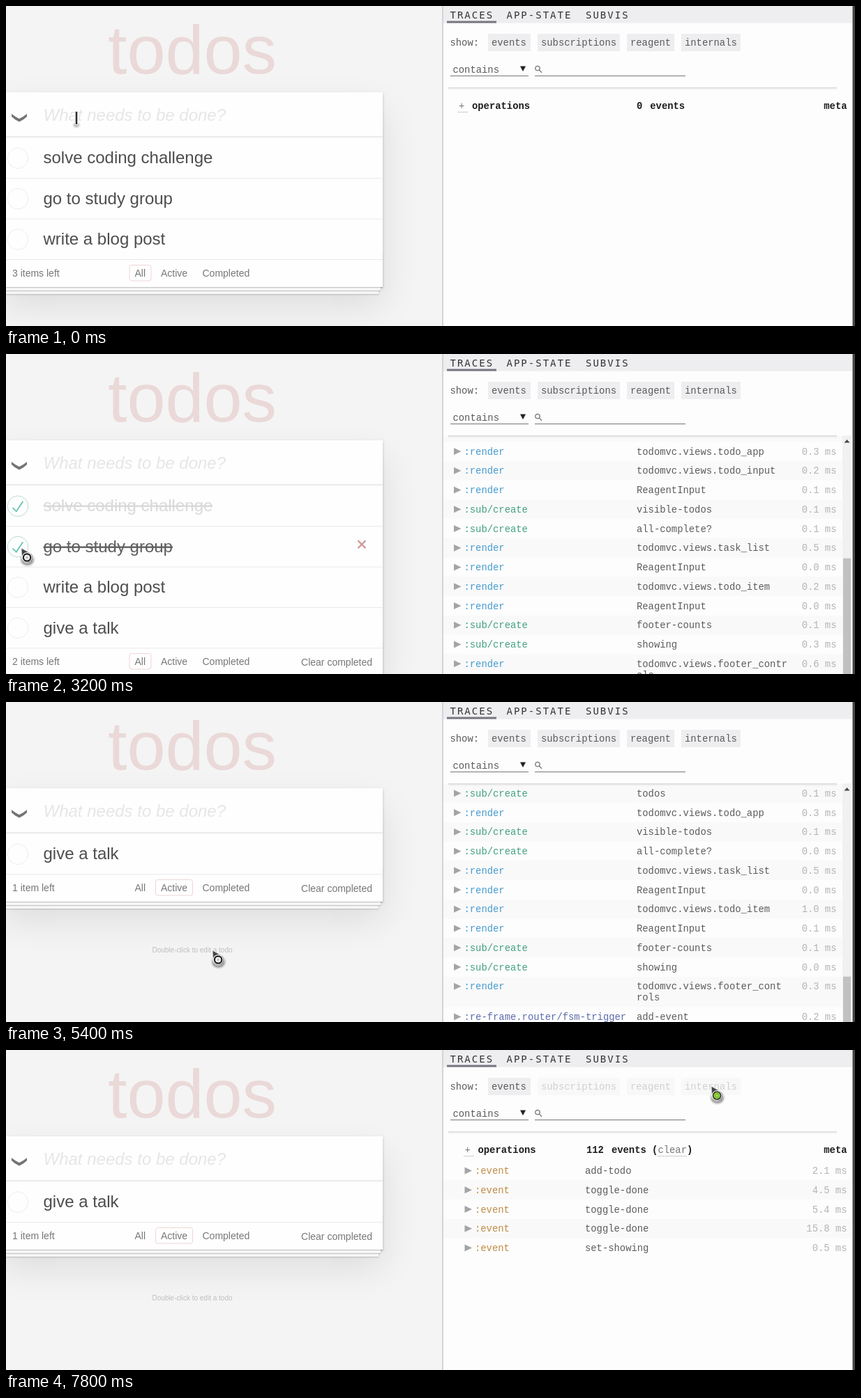
These frames come from a looping animation (1217x460 px, 8000 ms). An HTML page:

```html
<!DOCTYPE html>
<html lang="en">
<head>
<meta charset="utf-8">
<title>Todo list with trace panel</title>
<style>
  html, body { margin: 0; width: 100%; height: 100%; overflow: hidden; background: #f4f4f4; }
  #stage { position: relative; width: 100%; height: 100%; overflow: hidden; contain: strict; }
  #card, #foot { position: absolute; left: -6px; width: 546px; background: #fefefe; }
  #card { top: 124px; box-shadow: 0 2px 4px rgba(0,0,0,.2), 0 25px 50px rgba(0,0,0,.1); }
  #foot { bottom: 0; left: 0; height: 50px;
    box-shadow: 0 1px 1px rgba(0,0,0,.2), 0 8px 0 -3px #f6f6f6, 0 9px 1px -3px rgba(0,0,0,.2),
      0 16px 0 -6px #f6f6f6, 0 17px 2px -6px rgba(0,0,0,.2); }
  svg { position: absolute; left: 0; top: 0; display: block; width: 100%; height: 100%; overflow: hidden; }
  text { white-space: pre; }
  .sans { font-family: "Liberation Sans", Arial, sans-serif; }
  .mono { font: 13.85px "Liberation Mono", "Courier New", monospace; }
  .tab { font: 14px "DejaVu Sans Mono", monospace; letter-spacing: 2px; fill: #333; }
  .b { font-weight: bold; fill: #1c1c1c; }
</style>
</head>
<body>
<div id="stage">
<div id="card"><div id="foot"></div></div>
<svg viewBox="0 0 1217 460">
  <defs>
    <clipPath id="view"><rect x="627" y="118" width="586" height="342"/></clipPath>
    <linearGradient id="fall" x2="0" y2="1">
      <stop stop-color="#000" stop-opacity=".2"/><stop offset="1" stop-color="#000" stop-opacity="0"/>
    </linearGradient>
    <filter id="blur" x="-50%" y="-50%" width="200%" height="200%"><feGaussianBlur stdDeviation="1.6"/></filter>
  </defs>
  <text class="sans" x="267" y="97" font-size="99" text-anchor="middle" fill="#ead9d8">todos</text>
  <g id="todo" class="sans"></g>
  <rect x="625" width="2" height="460" fill="#d4d4d4"/>
  <rect x="627" width="587" height="460" fill="#fdfdfd"/>
  <g id="table" class="mono" clip-path="url(#view)"></g>
  <rect x="627" width="587" height="24.5" fill="#eeeef1"/>
  <rect x="632" y="21.5" width="71" height="3" fill="#767681"/>
  <text class="tab" x="636.5" y="18">TRACES</text>
  <text class="tab" x="717.5" y="18">APP-STATE</text>
  <text class="tab" x="831" y="18">SUBVIS</text>
  <g class="mono" fill="#5a5a5a">
    <text x="636.5" y="57">show:</text>
    <g id="buttons"></g>
    <text x="640.5" y="95.5">contains</text>
  </g>
  <path d="M637 100.5H749M758 100.5H974" stroke="#777"/>
  <path d="M737 86.500h8l-4 7.500z" fill="#222"/>
  <g fill="none" stroke="#777" stroke-width="1.3"><circle cx="762" cy="89.5" r="3.2"/><path d="M764.3 92l3.7 3.8"/></g>
  <rect x="634" y="117" width="557" height="1" fill="#d6d6d6"/>
  <rect x="634" y="118" width="557" height="3" fill="url(#fall)" opacity=".4"/>
  <g id="bar"></g>
  <rect x="1213.5" width="3.5" height="460" fill="#444"/>
  <g id="cursor"></g>
</svg>
</div>
<script>
const $ = id => document.getElementById(id);
const LOOP = 8000, ROW = 27.75, LIST = 190, ITEM = 58.4, CHAR = 8.31;
const tasks = ['solve coding challenge', 'go to study group', 'write a blog post', 'give a talk'];
const toggled = [2600, 3150, 3650];
const colors = {
  ':render': '#469bd0', ':re-frame.router/fsm-trigger': '#5b6bab',
  ':event': '#c08c45', ':sub/run': '#a25bf0', ':sub/create': '#43a083'
};
const buttons = [['events', 691, 61], ['subscriptions', 762, 118, 6600], ['reagent', 890, 68, 7200], ['internals', 968, 85, 7800]];

const text = (x, y, s, attrs = '') => `<text x="${x}" y="${y}" ${attrs}>${s}</text>`;
const rect = (x, y, w, h, attrs) => `<rect x="${x}" y="${y}" width="${w}" height="${h}" ${attrs}/>`;
const path = (d, attrs) => `<path d="${d}" ${attrs}/>`;
const ball = (r, fill) => `<circle cx="7.5" cy="12.5" r="${r}" fill="${fill}"/>`;

// Each event leaves the same chain of router, subscription and render traces.
function chain(event, times, { input = false, drop = 0 } = {}) {
  const fsm = ':re-frame.router/fsm-trigger', run = ':sub/run', make = ':sub/create', view = ':render';
  const views = n => [view, 'todomvc.views.' + n], field = [view, 'ReagentInput'];
  const subs = ['sorted-todos', 'showing', 'todos', 'visible-todos', 'all-complete?', 'completed-count', 'footer-counts'];
  const list = [
    [fsm, 'add-event'], [':event', event], [fsm, 'finish-run'], [fsm, 'run-queue'],
    ...subs.slice(drop).map(n => [run, n]),
    [make, 'todos'], views('todo_app'), ...(input ? [views('todo_input'), field] : []),
    [make, 'visible-todos'], [make, 'all-complete?'], views('task_list'), field, views('todo_item'), field,
    [make, 'footer-counts'], [make, 'showing'], views('footer_controls')
  ];
  const ms = times.split(' ');
  return list.map(([op, name], i) => ({ op, name, ms: ms[i] || '0.1' }));
}
const subTimes = ' 0.1 0.1 0.1 0.1 0.1 0.1 0.0 0.1 ';
const traces = [
  { op: ':render', name: 'todomvc.views.todo_input', ms: '0.7' },
  { op: ':render', name: 'ReagentInput', ms: '0.2' },
  ...chain('add-todo', '0.2 2.1 0.1 2.5 0.1 0.1 0.1 0.1 1.1 0.1 0.0 0.1 0.3 0.2 0.1 0.1 0.1 0.5 0.0 0.2 0.0 0.1 0.3 0.6', { input: true }),
  ...chain('toggle-done', '0.2 4.5 0.1 4.9' + subTimes + '0.3 0.1 0.0 0.5 0.0 1.0 0.1 0.1 0.0 0.3'),
  ...chain('toggle-done', '0.2 5.4 0.1 5.8' + subTimes + '0.4 0.1 0.0 0.9 0.1 0.2 0.1 0.1 0.0 0.5'),
  ...chain('toggle-done', '0.8 15.8 0.2 16.8' + subTimes + '0.4 0.1 0.0 0.8 0.1 0.2 0.1 0.1 0.0 0.4'),
  ...chain('set-showing', '0.2 0.5 0.1 0.9', { drop: 2 })
];

// Latest value whose start time has passed.
const at = (t, steps) => steps.filter(s => t >= s[0]).pop()[1];
const traceCount = t => at(t, [[0, 0], [1100, 2], [1400, 26], [2600, 48], [3150, 70], [3650, 92], [5000, 112]]);

const moves = [
  [0, 101, 160], [1700, 101, 160], [2300, 25, 219], [2800, 25, 219], [3100, 22, 279], [3300, 22, 279],
  [3600, 24, 338], [3800, 24, 338], [4200, 204, 390], [4300, 204, 390], [4800, 234, 438], [5300, 234, 438],
  [5400, 296, 357], [5600, 722, 182], [5800, 722, 182], [6400, 788, 55], [6600, 788, 53], [7000, 901, 53],
  [7300, 901, 53], [7600, 1011, 52], [8000, 1011, 52]
];
function pointer(t) {
  const i = Math.max(1, moves.findIndex(m => m[0] >= t));
  const [t0, x0, y0] = moves[i - 1], [t1, x1, y1] = moves[i];
  const p = (t - t0) / (t1 - t0);
  return [x0 + (x1 - x0) * p, y0 + (y1 - y0) * p];
}

function scrollTop(t) {
  if (t >= 6600) return 884;
  return t < 3400 ? Math.max(0, Math.min(454, .695 * (t - 2600))) : Math.min(1080, 454 + .76 * (t - 3400));
}

function drawItem(label, y, done, fade, hover) {
  const grey = Math.round(77 + 140 * fade), ink = `rgb(${grey},${grey},${grey})`;
  const cy = y + 28.7;
  let s = `<circle cx="17" cy="${cy}" r="14.8" fill="none" stroke="${done ? '#bddad5' : '#ededed'}"/>`;
  if (done) s += path('M72 25L42 71 27 56l-4 4 20 20 34-52z', `transform="translate(2.2 ${cy - 14.8}) scale(.2963)" fill="#5dc2af"`);
  s += text(53.5, Math.round(y + 36.4), label, `font-size="24" fill="${ink}"${done ? ' text-decoration="line-through"' : ''}`);
  if (hover) s += path(`M504.5 ${cy - 9}l11 11m0 -11l-11 11`, 'stroke="#cc9a9a" stroke-width="2.2"');
  return s + rect(0, y + ITEM - 1.2, 540, 1, 'fill="#e9e9e9"');
}

function drawTodo(t, mx, my) {
  const active = t >= 5000;
  const shown = active ? [3] : t >= 1400 ? [0, 1, 2, 3] : [0, 1, 2];
  const doneCount = toggled.filter(d => t >= d).length;
  const left = (t >= 1400 ? 4 : 3) - doneCount;
  const end = LIST + ITEM * shown.length;
  $('card').style.height = Math.round(end + 39) - 124 + 'px';

  let s = path('M8 155Q14 160 19 162Q24 160 30 155V159Q25 164 19 166.5Q13 164 8 159Z', 'fill="#737373"');
  s += t >= 1100 && t < 1400
    ? text(53.5, 165, 'give a talk', 'font-size="24" fill="#4d4d4d"')
    : text(53.5, 165, 'What needs to be done?', 'font-size="24" font-style="italic" fill="#e6e6e6"');
  s += rect(0, 187.5, 540, 1.5, 'fill="#e5e5e5"');
  shown.forEach((n, i) => {
    const y = LIST + ITEM * i, fade = Math.max(0, Math.min(1, (t - toggled[n]) / 400)) || 0;
    s += drawItem(tasks[n], y, t >= toggled[n], fade, mx < 540 && my >= y && my < y + ITEM);
  });
  const base = Math.round(end + 23.6), small = 'font-size="14" fill="#777"';
  s += text(9, base, `${left} item${left === 1 ? '' : 's'} left`, small);
  const [bx, bw] = active ? [214.5, 53] : [177, 31];
  s += rect(bx, base - 16.5, bw, 22.5, 'rx="3" fill="none" stroke="#efd5d5"');
  s += text(184.5, base, 'All', small) + text(222, base, 'Active', small) + text(281.5, base, 'Completed', small);
  if (doneCount) s += text(525, base + 1, 'Clear completed', small + ' text-anchor="end"');
  s += text(267, base + 88, 'Double-click to edit a todo', 'font-size="10" fill="#bfbfbf" text-anchor="middle"');
  $('todo').innerHTML = s;
}

function drawTable(t) {
  const count = traceCount(t), bar = t >= 2600 && t < 7200;
  const [x, col] = at(t, [[0, [649, 902]], [1100, [659, 810]], [1400, [642, 911]], [2600, [642, 904]], [7200, [643, 936]], [7800, [657.5, 830]]]);
  const right = bar ? 1190.5 : 1205.5, wrap = count > 70 ? 25 : 26;
  const scroll = bar ? scrollTop(t) : 0, top = (bar ? 138.5 : 143.5) - scroll;
  const rows = traces.slice(0, count).filter(({ op }) =>
    !(t >= 6600 && op.startsWith(':sub')) && !(t >= 7200 && op === ':render') && !(t >= 7800 && op.startsWith(':re-')));

  const base = top + 4.5, ev = col + 2 + CHAR * String(count).length + 11;
  let s = text(x, base, '+', 'fill="#777"') + text(x + 19, base, 'operations', 'class="b"');
  let dots = `M${x - 1} ${top + 9}h14`;
  s += text(col + 2, base, count, 'class="b"') + text(ev, base, 'events', 'class="b"');
  if (count) {
    const px = ev + CHAR * 7;
    s += text(px, base, '(', 'class="b"') + text(px + CHAR, base, 'clear', 'fill="#777"') + text(px + CHAR * 6, base, ')', 'class="b"');
    dots += `M${px + CHAR} ${top + 9}h${CHAR * 5}`;
  }
  s += path(dots, 'stroke="#888" stroke-dasharray="1 1.5"') + text(right, base, 'meta', 'class="b" text-anchor="end"');

  let y = top + 30;
  rows.forEach(({ op, name, ms }, i) => {
    const extra = name.length > wrap ? 16 : 0, line = Math.round(y + 4.7);
    if (y > 90 && y < 480) {
      if (i % 2) s += rect(627, y - 14, bar ? 572 : 586, ROW + extra, 'fill="#f9f9f9"');
      s += path(`M${x} ${y - 5}l10.5 5l-10.5 5z`, 'fill="#a4a4a4"');
      s += text(x + 14.5, line, op, `fill="${colors[op]}"`);
      s += text(col, line, name.slice(0, wrap), 'fill="#5c5c5c"');
      if (extra) s += text(col, line + 16, name.slice(wrap), 'fill="#5c5c5c"');
      s += text(right, line, ms + ' ms', 'fill="#b4b4b4" text-anchor="end"');
    }
    y += ROW + extra;
  });
  $('table').innerHTML = s;

  const full = y + scroll - 117, track = 782;
  $('bar').innerHTML = bar
    ? rect(1199, 117, 13, 343, 'fill="#f1f1f1"') + path('M1201.5 127.5h8l-4 -4.5z', 'fill="#444"') +
      rect(1200, 134 + scroll / full * track, 11, track * 805 / full, 'fill="#c1c1c1"')
    : '';
}

function drawButtons(t) {
  $('buttons').innerHTML = buttons.map(([name, x, w, off]) => {
    const dim = t >= off;
    return rect(x, 40, w, 25, `fill="${dim ? '#f8f8f9' : '#eeeef0'}"`) +
      text(x + 5, 57, name, `fill="${dim ? '#d0d0d0' : '#5a5a5a'}"`);
  }).join('');
}

function drawCursor(t, x, y) {
  if (t < 1800) {
    $('cursor').innerHTML = `<ellipse cx="101" cy="171" rx="4" ry="3" opacity=".35" filter="url(#blur)"/>` +
      rect(98.5, 150.5, 5, 21, 'rx="2" fill="#eee"') + rect(99.8, 152, 2.4, 18, 'fill="#2b2b2b"');
    return;
  }
  const link = y < 66 && x > 690 || t >= 4700 && t < 5000;
  $('cursor').innerHTML = `<g transform="translate(${x} ${y}) scale(1.08)">
    <ellipse cx="8" cy="15.5" rx="8.5" ry="7.5" opacity=".45" filter="url(#blur)"/>
    <path d="M0 0L13 7.5A7.4 7.4 0 1 1 .6 14Z" fill="#444" stroke="#e4e4e4" stroke-width=".9"/>` +
    ball(6.9, '#f2f2f2') + ball(5.8, '#1e1e1e') +
    ball(link ? 4.6 : 3.8, link ? '#84c03a' : '#f0f0f0') + ball(1.5, link ? '#a6dc5c' : '#b5b5b5') + '</g>';
}

let shown = -1;
function draw(t) {
  if (t === shown) return;
  shown = t;
  const [x, y] = pointer(t);
  drawTodo(t, x, t < 1800 ? 0 : y);
  drawTable(t);
  drawButtons(t);
  drawCursor(t, x, y);
}

// The picture moves in steps of a tenth of a second.
const start = performance.now();
function tick() {
  draw(Math.floor((performance.now() - start) % LOOP / 100) * 100);
  requestAnimationFrame(tick);
}
tick();
</script>
</body>
</html>
```
